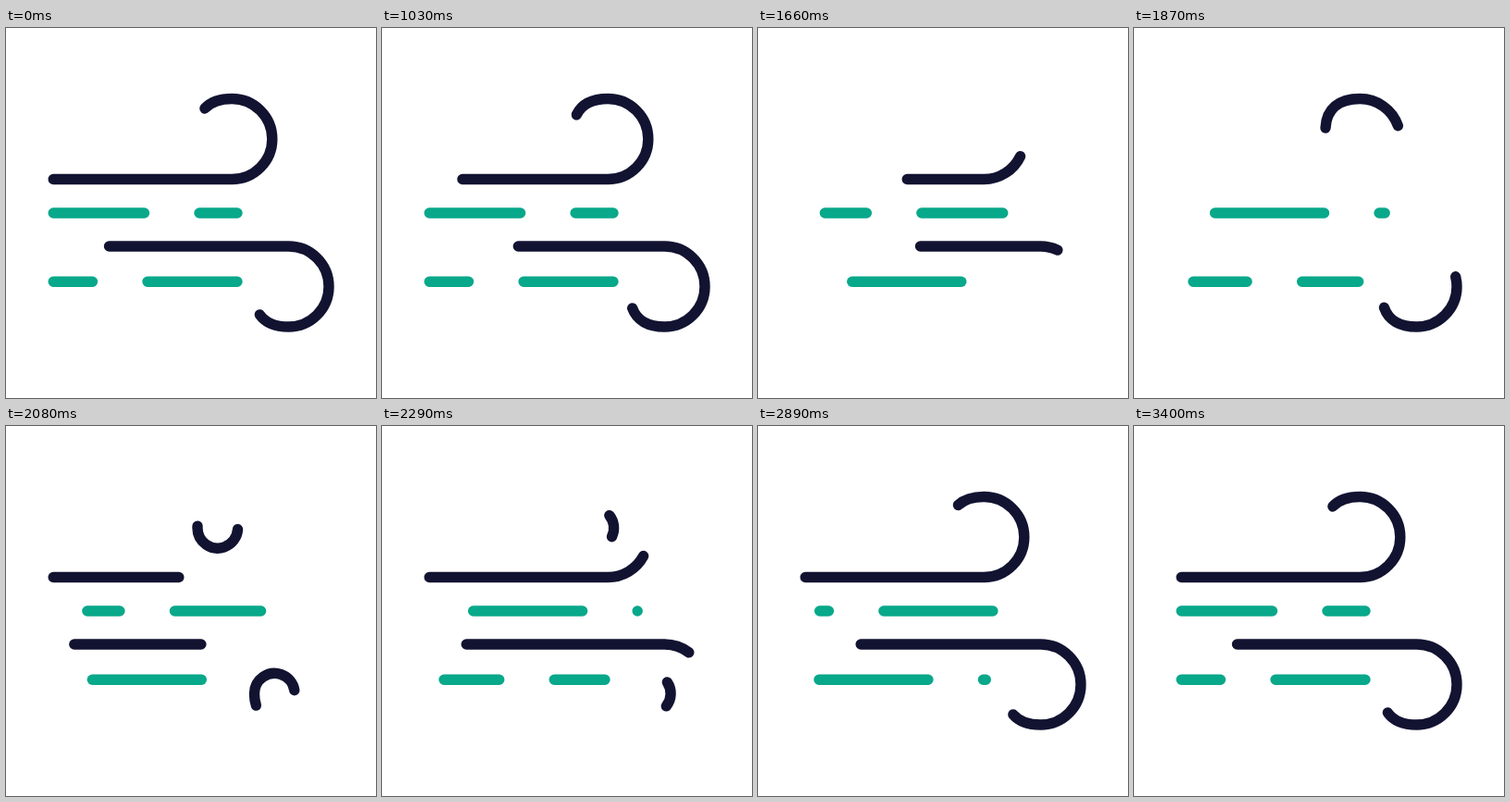
These frames come from a looping animation (400x400 px, 3.43 s). An HTML page:

```html
<!DOCTYPE html>
<html lang="en">
<head>
<meta charset="utf-8">
<title>Wind</title>
<style>
  html, body { margin: 0; width: 100%; height: 100%; overflow: hidden; background: #fff; }
  svg { display: block; width: 100%; height: 100%; }
  path { fill: none; stroke-width: 11.4; stroke-linecap: round; stroke-linejoin: round; }
  .gust { stroke: #121331; }
  .dash { stroke: #08a88a; }
</style>
</head>
<body>
<svg id="stage" viewBox="0 0 400 400"></svg>
<script>
const LOOP = 3430, HOLD = 1000, STEP = 30;
const stage = document.getElementById('stage');

function addPath(cls, d = '') {
  const p = document.createElementNS('http://www.w3.org/2000/svg', 'path');
  p.setAttribute('class', cls);
  p.setAttribute('d', d);
  return stage.appendChild(p);
}

const clamp = x => Math.min(1, Math.max(0, x));
const mix = (a, b, k) => a + (b - a) * k;
const easeOut = (t, start, span) => 1 - Math.pow(1 - clamp((t - start) / span), 2.5);
const smooth = x => { x = clamp(x); return x * x * (3 - 2 * x); };

// Each curl runs along a line, round a half circle and into a small inner spiral.
// tail and head are the path lengths between which it is visible at rest.
const curls = [
  { tail: 0, head: 361.6,
    d: 'M51.2 163.5H244.3A43.5 43.5 0 0 0 244.3 76.5C221 76.5 207 88 207 110.3A21.8 21.8 0 1 0 245.8 96.6' },
  { tail: 60.3, head: 425.8,
    d: 'M51.2 236H305.5A43.5 43.5 0 0 1 305.5 323C282.5 323 268.5 311.5 268.5 289.2A21.8 21.8 0 1 1 307.3 302.9' }
].map(c => {
  const parts = [0, 1, 2].map(() => addPath('gust', c.d));
  return { ...c, parts, len: parts[0].getTotalLength() };
});

// left, right and drift: how far the ends and the dashes shift at mid-cycle.
const rows = [
  { y: 200, left: 38, right: 26.5, drift: 34.3, phase: 31.5 },
  { y: 274.3, left: 16, right: -9.1, drift: 0, phase: -24.5 }
].map(r => ({ ...r, path: addPath('dash') }));

const DASH = 118, PERIOD = 177.5;

function trim(path, from, to) {
  const n = to - from;
  path.style.display = n > 0.05 ? '' : 'none';
  path.setAttribute('stroke-dasharray', Math.max(n, 0) + ' 2000');
  path.setAttribute('stroke-dashoffset', -from);
}

function drawCurl(c, t) {
  const out = easeOut(t, 0.34, 21.2);
  const back = easeOut(t, 29.4, 38.5);
  trim(c.parts[0], mix(c.tail, c.len, out), mix(c.head, c.len, out));
  trim(c.parts[1], c.len * easeOut(t, 18.4, 35.6), c.len * easeOut(t, 14.77, 28.8));
  trim(c.parts[2], c.tail * back, c.head * back);
}

function drawRow(r, t) {
  const u = t - 0.5;
  const swell = smooth(1 - Math.abs(u - 40) / 40);
  const lo = 51.2 + r.left * swell;
  const hi = 250 + r.right * swell;
  const run = r.phase + r.drift * swell + 4 * PERIOD * smooth(u / 80);
  let d = '';
  for (let x = run % PERIOD - PERIOD; x <= hi; x += PERIOD) {
    const a = Math.max(x, lo), b = Math.min(x + DASH, hi);
    if (b >= a) d += `M${a.toFixed(2)} ${r.y}H${b.toFixed(2)}`;
  }
  r.path.setAttribute('d', d);
}

function draw(ms) {
  const step = Math.floor((ms % LOOP - HOLD) / STEP + 0.001);
  const t = step >= 80 ? 0 : Math.max(0, step);
  curls.forEach(c => drawCurl(c, t));
  rows.forEach(r => drawRow(r, t));
}

const begin = performance.now();
function tick() {
  draw(performance.now() - begin);
  requestAnimationFrame(tick);
}
tick();
</script>
</body>
</html>
```
